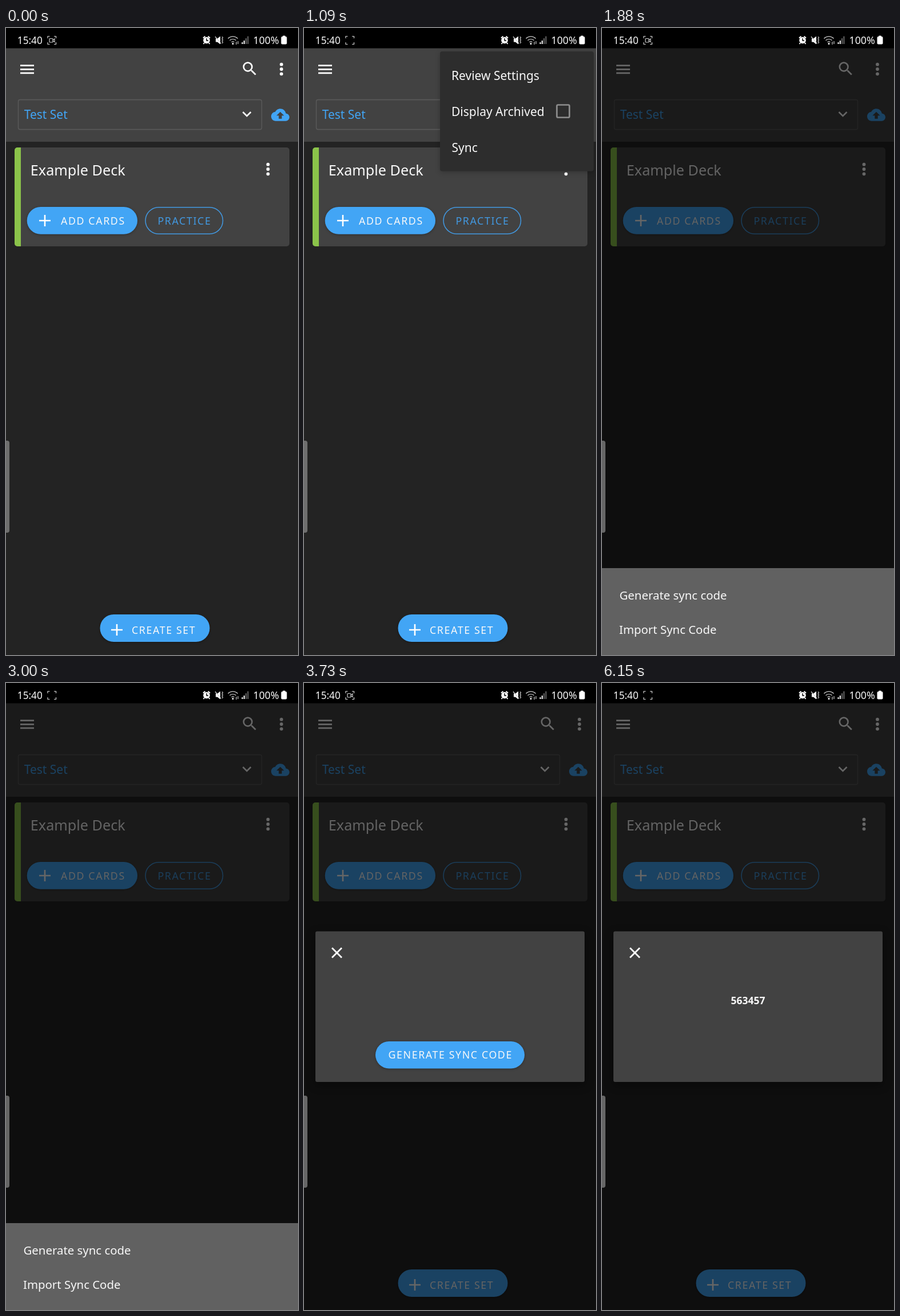
Write an HTML page that moves like this. It is 511 px wide and 1097 px high and loops after 6210 ms.

```html
<!DOCTYPE html>
<html lang="en">
<head>
<meta charset="utf-8">
<title>Sync code</title>
<style>
html, body { margin: 0; width: 100%; height: 100%; overflow: hidden; background: #000; }
svg { display: block; width: 100%; height: 100%; }
text { font: 21px "Noto Sans", sans-serif; fill: #f8f8f8; white-space: pre; }
text.caps { font-size: 17.8px; letter-spacing: 1.6px; }
text.bar { font-size: 17.2px; }
text.row { font-size: 20.4px; }
.line { fill: none; stroke: #fff; stroke-width: 2.6; }
.thin { fill: none; stroke: #d0d0d0; stroke-width: 1.2; }
.blue { fill: #42a5f5; }
.raised { filter: drop-shadow(0 1.5px 2px rgba(0,0,0,.3)); }
.menu { filter: drop-shadow(0 2px 4px rgba(0,0,0,.22)); }
.float { filter: drop-shadow(0 5px 8px rgba(0,0,0,.4)); }
</style>
</head>
<body>
<svg viewBox="0 0 511 1097">
  <defs>
    <g id="dots"><circle cy="-8.3" r="2.9"/><circle r="2.9"/><circle cy="8.3" r="2.9"/></g>
    <path id="plus" class="line" d="M-10 0H10M0-10V10"/>
    <clipPath id="reveal"><rect id="revealBox" y="30"/></clipPath>
    <clipPath id="syncRow"><rect x="238" y="178" width="269" height="62.5"/></clipPath>
    <clipPath id="sheetRow"><rect y="962" width="511" height="60"/></clipPath>
    <clipPath id="pill"><rect x="125" y="627" width="261" height="47.5" rx="23.7"/></clipPath>
  </defs>

  <!-- main screen -->
  <rect width="511" height="1097" fill="#232323"/>
  <rect y="35" width="511" height="164" fill="#424242"/>
  <g fill="#fff">
    <path d="M25 64.2h24v2.7H25zM25 71h24v2.7H25zM25 77.6h24v2.7H25z"/>
    <path transform="translate(410.5 55.3) scale(1.333)" d="M15.5 14h-.79l-.28-.27A6.47 6.47 0 0 0 16 9.5 6.5 6.5 0 1 0 9.5 16c1.61 0 3.09-.59 4.23-1.57l.27.28v.79l5 4.99L20.49 19l-4.99-5zm-6 0C7.01 14 5 11.99 5 9.5S7.01 5 9.5 5 14 7.01 14 9.5 11.99 14 9.5 14z"/>
    <use href="#dots" x="482" y="72"/>
  </g>
  <rect x="21.5" y="125.5" width="426" height="52" rx="3" fill="none" stroke="#5b5b5b" stroke-width="1.3"/>
  <text x="31.7" y="159" style="fill:#42a5f5;font-weight:500">Test Set</text>
  <path class="line" d="M414.5 147l7 7 7-7"/>
  <path class="blue" transform="translate(464 136) scale(1.333)" d="M19.35 10.04C18.67 6.59 15.64 4 12 4 9.11 4 6.6 5.64 5.35 8.04 2.34 8.36 0 10.91 0 14c0 3.31 2.69 6 6 6h13c2.76 0 5-2.24 5-5 0-2.64-2.05-4.78-4.65-4.96zM14 13v4h-4v-4H7l5-5 5 5h-3z"/>

  <rect x="15" y="209" width="481" height="173" rx="5" fill="#424242"/>
  <path d="M26 209H20a5 5 0 0 0-5 5V377a5 5 0 0 0 5 5H26z" fill="#8bc34a"/>
  <text x="42.800" y="258" style="font-size:25.2px">Example Deck</text>
  <use href="#dots" x="458.5" y="247" fill="#fff"/>
  <rect class="blue raised" x="36.7" y="313" width="193.3" height="47.8" rx="23.9"/>
  <use href="#plus" x="68" y="337"/>
  <text class="caps" x="96" y="343.5">ADD CARDS</text>
  <rect x="244" y="313.7" width="135.5" height="46.5" rx="23.2" fill="none" stroke="#4298e0" stroke-width="1.5"/>
  <text class="caps" x="265.5" y="343.5" style="fill:#4298e0">PRACTICE</text>
  <g>
    <rect class="blue raised" x="164.5" y="1026" width="192" height="48" rx="24"/>
    <use href="#plus" x="194" y="1053"/>
    <text class="caps" x="220" y="1059.5">CREATE SET</text>
  </g>
  <circle id="iconRipple" fill="#fff"/>

  <!-- overflow menu -->
  <g id="menu"><g clip-path="url(#reveal)"><g id="menuBody">
    <rect class="menu" x="238" y="41" width="269" height="209.5" rx="4" fill="#2d2d2d"/>
    <g clip-path="url(#syncRow)"><circle id="syncRipple" fill="#fff"/></g>
    <text x="258" y="90.5">Review Settings</text>
    <text x="258" y="153.7">Display Archived</text>
    <rect x="442.5" y="134.5" width="22" height="22" rx="2" fill="none" stroke="#8d8d8d" stroke-width="2.7"/>
    <text x="258.5" y="217">Sync</text>
  </g></g></g>

  <rect id="dim" width="511" height="1097"/>

  <!-- bottom sheet -->
  <g id="sheet">
    <rect y="945" width="511" height="152" fill="#616161"/>
    <g clip-path="url(#sheetRow)"><circle id="sheetRipple" fill="#fff"/></g>
    <text class="row" x="30.500" y="999.5">Generate sync code</text>
    <text class="row" x="30" y="1059.7">Import Sync Code</text>
  </g>

  <!-- dialog -->
  <g id="dialog">
    <rect class="float" x="20" y="434.5" width="471" height="263.5" rx="3" fill="#424242"/>
    <path class="line" style="stroke-width:2.8" d="M49 463.5l17 17M66 463.5l-17 17"/>
    <g id="generate">
      <rect class="blue raised" x="125" y="627" width="261" height="47.5" rx="23.7"/>
      <g clip-path="url(#pill)"><circle id="pillRipple" fill="#fff"/></g>
      <text class="caps" x="147.5" y="657.3">GENERATE SYNC CODE</text>
    </g>
    <text id="code" x="225.5" y="562.3" style="font-size:17.5px;font-weight:600">563457</text>
  </g>

  <path d="M0 722h2a4 4 0 0 1 4 4V879a4 4 0 0 1-4 4H0z" fill="#a0a0a0" fill-opacity=".6"/>

  <!-- status bar -->
  <rect width="511" height="35.5"/>
  <text class="bar" x="19.8" y="27.5">15:40</text>
  <path class="thin" d="M73 18v-3.500h3.500M84 14.500h3.500v3.500M87.500 25v3.500h-3.500M76.500 28.500h-3.500v-3.500"/>
  <g id="camera" class="thin">
    <rect x="76" y="18.500" width="6" height="6.500" rx="1"/><path d="M82 21l3-2v5.500l-3-2"/>
  </g>
  <g fill="#fff">
    <circle cx="351" cy="21.500" r="5.800"/>
    <path class="line" style="stroke-width:2" d="M345 17.500l3.500-3M357 17.500l-3.500-3M347 26l-1.500 2M355 26l1.500 2"/>
    <path d="M351 18v4h3" fill="none" stroke="#000" stroke-width="1.400"/>
    <path d="M367 18.500h3l5-4v14l-5-4h-3z"/>
    <path class="thin" d="M366 15l10 12M378 15l1.500 2-1.500 2 1.500 2-1.500 2 1.500 2-1.500 2"/>
    <path class="thin" d="M388.500 18.500a12 12 0 0 1 17 0M391.500 21.700a8 8 0 0 1 11 0M394.500 24.800a4 4 0 0 1 5 0M403 24v5M406 28v-5"/>
    <circle cx="397" cy="27.500" r="1.500"/>
    <path d="M412.500 25h2v3h-2zM415.800 22h2v6h-2z"/>
    <path d="M419.100 18h2v10h-2zM422.400 14.500h2v13.500h-2z" fill="#666"/>
    <rect x="481.500" y="15" width="10" height="13.500" rx="2"/><rect x="484.200" y="13.500" width="4.600" height="3"/>
  </g>
  <text class="bar" x="432.500" y="27.500" style="font-size:17.800px">100%</text>

  <circle id="touch" r="12" fill="#c4c4c8" stroke="#8090b0" stroke-width=".6"/>
</svg>
<script>
const LOOP = 6210;
const $ = id => document.getElementById(id);
const set = (id, attrs) => { for (const k in attrs) $(id).setAttribute(k, attrs[k]); };
const ramp = (t, start, length) => Math.min(1, Math.max(0, (t - start) / length));
const out = p => 1 - (1 - p) ** 2;

// x, y, finger down, finger up
const taps = [
  [482, 72, 30, 190],
  [453, 213, 1380, 1640],
  [353, 987, 3160, 3500],
  [290, 655, 5200, 5450]
];

// A ripple grows from the touch while its centre drifts to the middle of the control.
function ripple(id, t, [x, y, down], cx, cy, radius, strength, fade) {
  const grow = out(ramp(t, down + 10, 315));
  const drift = Math.min(1, grow * 1.1);
  set(id, {
    cx: x + (cx - x) * drift,
    cy: y + (cy - y) * drift,
    r: radius * grow,
    opacity: strength * (1 - ramp(t, fade, 180))
  });
}

function draw(t) {
  // overflow menu unfolds from its top right corner
  const open = out(ramp(t, 170, 220));
  const width = 290 * (0.3 + 0.7 * open), height = 250 * (0.15 + 0.85 * open);
  set("revealBox", { x: 511 - width, width, height });
  set("menuBody", { transform: `translate(0 ${-20 * (1 - open)})` });
  set("menu", { opacity: ramp(t, 170, 110) * (1 - ramp(t, 1640, 120)) });

  // sheet in, sheet out, dialog in
  const rise = ramp(t, 1640, 240), fall = ramp(t, 3395, 190), pop = ramp(t, 3462, 180);
  set("sheet", {
    transform: `translate(0 ${152 * ((1 - rise) ** 2 + fall)})`,
    opacity: Math.min(1, rise * 1.5) * (1 - fall ** 1.3)
  });
  set("dialog", { transform: `translate(0 ${31 * (1 - pop) ** 2})`, opacity: pop });
  set("dim", { opacity: 0.6 * (rise * (1 - fall) + pop) });

  const done = t >= 5640;
  set("generate", { opacity: done ? 0 : 1 });
  set("code", { opacity: done ? 1 : 0 });

  ripple("iconRipple", t, taps[0], 482, 72, 27, 0.2, 200);
  ripple("syncRipple", t, taps[1], 372, 209, 138, 0.2, 1700);
  ripple("sheetRipple", t, taps[2], 255, 992, 258, 0.12, 3400);
  ripple("pillRipple", t, taps[3], 255, 651, 133, 0.24, 5460);

  const tap = taps.find(([, , down, up]) => t >= down && t < up + 100);
  set("touch", tap
    ? { cx: tap[0], cy: tap[1], opacity: 0.48 * (1 - ramp(t, tap[3], 100)) }
    : { opacity: 0 });

  const recording = t < 30 || t % 1000 >= 640 || (t >= 6000 && t < 6150);
  set("camera", { opacity: recording ? 1 : 0 });
}

const begin = performance.now();
function frame() {
  draw((performance.now() - begin) % LOOP);
  requestAnimationFrame(frame);
}
frame();
</script>
</body>
</html>
```
